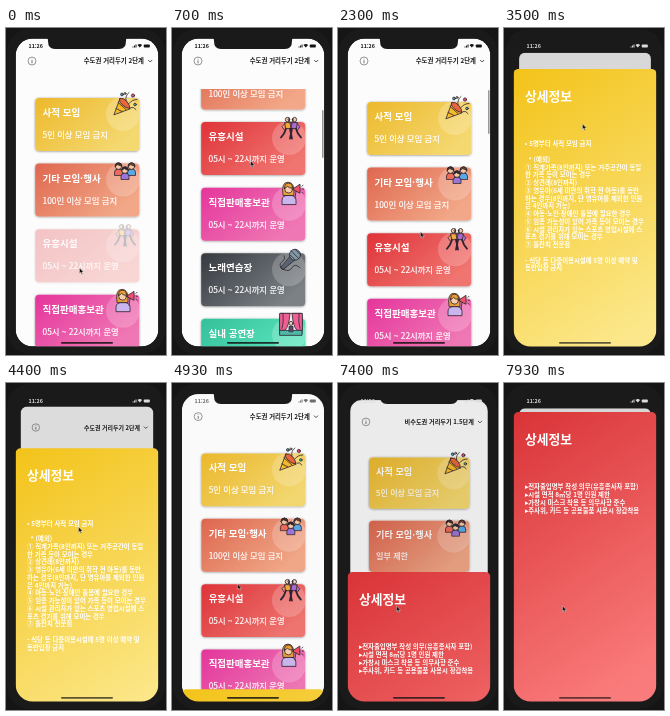
An HTML page that plays this animation: 160x327 px, repeating every 8 s.

```html
<!DOCTYPE html>
<html lang="ko">
<head>
<meta charset="utf-8">
<style>
  html, body { margin: 0; width: 100%; height: 100%; overflow: hidden; background: #151515; }
  svg { display: block; width: 100%; height: 100%; }
  text { font-family: "Noto Sans CJK KR", "Noto Sans CJK", "Noto Sans", sans-serif; white-space: pre; }
  .note { fill: #fff; stroke: #fff; stroke-width: .2; }
  .icon { stroke: #2b2430; stroke-width: .8; stroke-linejoin: round; stroke-linecap: round; }
</style>
</head>
<body>
<svg id="stage" viewBox="0 0 160 327"></svg>
<script>
const LOOP = 8000, SCREEN_BOTTOM = 319, SHEET_TOP = 29;
const CARD_TOP = 70, CARD_PITCH = 65.6;
const BEZEL = '#1a1a1a';
const stage = document.getElementById('stage');

// Text placed by its vertical centre
const label = (x, y, size, text, attrs = '') =>
  `<text x="${x}" y="${y + size * .37}" font-size="${size}" ${attrs}>${text}</text>`;
const path = (d, fill = 'none', extra = '') => `<path d="${d}" fill="${fill}" ${extra}/>`;
const dot = (x, y, r, fill) => `<circle cx="${x}" cy="${y}" r="${r}" fill="${fill}"/>`;
const rect = (x, y, w, h, fill, extra = '') =>
  `<rect x="${x}" y="${y}" width="${w}" height="${h}" fill="${fill}" ${extra}/>`;
const screenRect = (fill, extra) => rect(9.6, 10.4, 142.8, 308.2, fill, extra);
const gradient = (id, from, to, x2 = 1, y2 = .6) =>
  `<linearGradient id="${id}" x2="${x2}" y2="${y2}">
    <stop stop-color="${from}"/><stop offset="1" stop-color="${to}"/></linearGradient>`;

const person = (x, y, hair, shirt) =>
  path(`M${x - 4} ${y + 9}v-3q0-3 4-3t4 3v3z`, shirt) + dot(x, y, 3.3, '#f6c9a4') +
  path(`M${x - 3.3} ${y}a3.3 3.3 0 0 1 6.6 0q-3-.5-4-1.6q-1 1.2-2.6 1.6z`, hair);
const dancer = (x, flip, shirt) => `<g transform="translate(${x}) scale(${flip} 1)">` +
  path('M-1-5l5 0l1 6h-5zM4-4l4-4M-1-4l-3 3l2 3', shirt) +
  path('M0 1l-2 5l-3 4M4 1l1 5l-1 5', 'none', 'stroke-width="1.8"') +
  dot(1.5, -8, 2.2, '#f6c9a4') + '</g>';

// Icons drawn around their own centre, about 24 units wide
const icons = [
  path('M-11 11l6-16l10 10z', '#f7b928') + path('M-9 5l6 3M-7-1l8 7') +
    path('M-5-5q4-1 7 3t3 7q-4 0-8-4t-2-6z', '#e8663d') +
    path('M1-3q-1-5 3-8M4 0q3-4 8-4M6 4q3-1 5 2') +
    dot(-3, -9, 1.4, '#4aa8e0') + dot(8, -8, 1.6, '#ef4f74') + dot(10, 1, 1.3, '#56c596') + dot(0, -10, 1, '#ffd84a'),
  person(-6.5, -3, '#4b3324', '#ef6a5a') + person(6.5, -3, '#7a4527', '#59a9e8') + person(0, 1, '#2d2630', '#9b75d8'),
  dancer(-5, 1, '#f3a93c') + dancer(5, -1, '#a76bd6') + path('M-2-10v4M2-9v3'),
  path('M-9 11v-4q0-5 7-5t7 5v4z', '#c9b6ee') + path('M-8 2q-2-13 5-13t6 13z', '#e9a03a') +
    dot(-2.5, -4, 3.8, '#f8cfae') + path('M-6.500-5q0-5 4-5t4 5q-4 0-5-2q-1 2-3 2z', '#e9a03a') +
    path('M3-5l6-4v9l-6-3z', '#f25268') + path('M11-7l1-1M11.5-4h1M11-1l1 1M4 5l1-7'),
  path('M0-3l4 4l-12 10l-2-2z', '#596270') + dot(4, -4, 5.5, '#8199a6') +
    path('M0-8l8 8M4-9.500l5 5M-1-4l5 5') + path('M-9 10q-4-4 0-7t2-6M-9 10q7 4 10-1t8 0'),
  rect(-11, -11, 22, 21, '#f3f3ee', 'rx="1"') + path('M-11-11h10q-1 13-5 17h-5zM11-11h-10q1 13 5 17h5z', '#ef5f93') +
    path('M-8-11q1 9-1 15M8-11q-1 9 1 15') + path('M-11 6h22v5h-22z', '#4fb7a5') +
    dot(0, -1, 2, '#f8cfae') + path('M-2 7v-5h4v5z', '#5a4a70'),
  path('M-7-6h14l-2 17h-10z', '#e8942f') + path('M-6.300 0h12.600l-.7 6h-11.200z', '#f2c27e') +
    path('M-8-6v-3h2l1-2h10l1 2h2v3z', '#75492f') + dot(0, 3, 1.8, '#75492f')
];

const HOURS = '05시 ~ 22시까지 운영', PARTIAL = '일부 제한';
const cards = [
  ['사적 모임', '5인 이상 모임 금지', '#edb92c', '#f4d870'],
  ['기타 모임·행사', '100인 이상 모임 금지', '#df674f', '#f2a888', PARTIAL],
  ['유흥시설', HOURS, '#df3338', '#f07570', PARTIAL],
  ['직접판매홍보관', HOURS, '#e5359c', '#ef78b4'],
  ['노래연습장', HOURS, '#363a40', '#7c8185'],
  ['실내 공연장', HOURS, '#33c09a', '#5fe8c0'],
  ['식당·카페', HOURS, '#2aaec4', '#5cd8e6'],
  ['목욕장업', HOURS, '#6867d0', '#9fa1ec']
];

const cardMarkup = ([title, note, from, to, laterNote], i) => `
  <g id="card${i}" transform="translate(29 ${CARD_TOP + i * CARD_PITCH})">
    ${gradient('fill' + i, from, to)}
    ${rect(.2, 0, 104, 53, `url(#fill${i})`, 'rx="4" filter="url(#shadow)"')}
    <g clip-path="url(#cardClip)">${dot(88, 16, 17, 'rgba(255,255,255,.2)')}</g>
    ${label(7.5, 14.5, 9.5, title, 'fill="#fff" font-weight="700"')}
    ${label(7.5, 37, 8.35, note, `class="note ${laterNote ? 'before' : ''}"`)}
    ${laterNote ? label(7.5, 37, 8.35, laterNote, 'class="note after"') : ''}
    <g class="icon" transform="translate(90 5.5)">${icons[i] || ''}</g>
  </g>`;

const sheetMarkup = (id, from, to, lines) => `
  <g id="${id}">
    ${gradient(id + 'Fill', from, to, .3, 1)}
    ${rect(9.6, 0, 142.8, 320, `url(#${id}Fill)`, 'rx="5"')}
    <g fill="#fff" font-weight="700">
      ${label(21, 27, 12.8, '상세정보')}
      ${lines.map((line, i) => label(21, 75 + i * 7.75, 6.4, line)).join('')}
    </g>
  </g>`;

const yellowLines = [
  '• 5명부터 사적 모임 금지', '', '  * (예외)',
  '① 직계가족(8인까지) 또는 거주공간이 동일', '한 가족 등이 모이는 경우', '② 상견례(8인까지)',
  '③ 영유아(6세 미만의 취학 전 아동)를 동반', '하는 경우(8인까지, 단 영유아를 제외한 인원', '은 4인까지 가능)',
  '④ 아동·노인·장애인 돌봄에 필요한 경우', '⑤ 임종 가능성이 있어 가족 등이 모이는 경우',
  '⑥ 시설 관리자가 있는 스포츠 영업시설에 스', '포츠 경기를 위해 모이는 경우', '⑦ 돌잔치 전문점', '',
  '- 식당 등 다중이용시설에 5명 이상 예약 및', '동반입장 금지'
];
const redLines = [
  '▸전자출입명부 작성 의무(유흥종사자 포함)', '▸시설 면적 8㎡당 1명 인원 제한',
  '▸가창시 마스크 착용 등 의무사항 준수', '▸주사위, 카드 등 공용물품 사용시 장갑착용'
];

const METRO = '수도권 거리두기 2단계', REGION = '비수도권 거리두기 1.5단계';
const headerStyle = 'text-anchor="end" font-weight="700" fill="#1a1a1a"';

stage.innerHTML = `
  <defs>
    <clipPath id="screenClip">${screenRect('#fff', 'rx="17"')}</clipPath>
    <clipPath id="homeClip">${screenRect('#fff', 'rx="17" id="homeShape"')}</clipPath>
    <clipPath id="listClip">${rect(9, 61, 144, 258, '#fff')}</clipPath>
    <clipPath id="headerClip">${rect(50, 26, 89, 14, '#fff')}</clipPath>
    <clipPath id="cardClip">${rect(.2, 0, 104, 53, '#fff', 'rx="4"')}</clipPath>
    <filter id="shadow" x="-10%" y="-15%" width="120%" height="140%">
      <feDropShadow dx="0" dy=".4" stdDeviation="1.1" flood-opacity=".45"/>
    </filter>
  </defs>
  ${rect(1, 1, 158, 325, BEZEL, 'rx="23"')}
  <g clip-path="url(#screenClip)">
    <g id="home"><g clip-path="url(#homeClip)">
      ${screenRect('#fcfcfc', '')}
      <circle cx="26" cy="33" r="4" fill="none" stroke="#555" stroke-width=".6"/>
      ${path('M26 32.300v3M26 30.700v.6', 'none', 'stroke="#555" stroke-width=".8"')}
      <g clip-path="url(#headerClip)">
        ${label(138, 33, 6.4, METRO, headerStyle + ' class="before"')}
        <g id="region">${label(138, 33, 6.4, REGION, headerStyle + ' class="after"')}</g>
      </g>
      ${path('M142.200 32l2 2l2-2', 'none', 'stroke="#222" stroke-width=".8"')}
      <g clip-path="url(#listClip)">
        <g id="list">${cards.map(cardMarkup).join('')}</g>
        ${rect(150, 62, 1.6, 48, '#999', 'rx=".8" id="bar"')}
      </g>
      <g id="menu" text-anchor="end">
        ${label(139, 44.5, 5.1, METRO, 'fill="#777"')}
        ${label(139, 54, 5.1, REGION, 'fill="#777" id="choice"')}
      </g>
      ${screenRect('#000', 'id="dim"')}
    </g></g>
    ${sheetMarkup('yellow', '#f3c319', '#fce88c', yellowLines)}
    ${sheetMarkup('red', '#d93437', '#fa7b7b', redLines)}
    ${rect(55, 314, 52, 1.7, '#111', 'rx=".85" id="homeBar"')}
  </g>
  ${path('M39 9q3 0 3 4q0 8 7 8h64q7 0 7-8q0-4 3-4z', BEZEL)}
  <g id="status">
    ${label(22.5, 18, 5.4, '11:26', 'font-weight="600"')}
    ${path('M126.500 19.500v-1h1v1zM128 19.500v-2h1v2zM129.500 19.500v-3h1v3zM131.500 17q2.300-2 4.600 0l-2.300 2.600z', 'inherit')}
    ${rect(137.8, 16.5, 6, 3, 'inherit', 'rx=".8"')}
  </g>
  <g id="cursor">${path('M0 0v5.500l1.300-1.200l1 2.200l.9-.4l-1-2.100h1.800z', '#111', 'stroke="#fff" stroke-width=".35"')}</g>`;

const byId = id => document.getElementById(id);
const set = (id, name, value) => byId(id).setAttribute(name, value);
const clamp = v => Math.max(0, Math.min(1, v));
const ramp = (t, from, to) => clamp((t - from) / (to - from));

// Linear track of [time, value] pairs
function track(keys, t) {
  const i = keys.findIndex(([time]) => time > t);
  if (i < 0) return keys[keys.length - 1][1];
  if (i === 0) return keys[0][1];
  const [t0, v0] = keys[i - 1], [t1, v1] = keys[i];
  return v0 + (v1 - v0) * (t - t0) / (t1 - t0);
}

const scrollKeys = [[80, 0], [400, 55], [700, 107], [1000, 146], [1300, 163], [1500, 167],
  [1650, 160], [2000, 60], [2200, 3], [2300, -4], [2500, -2], [2900, 0]];
const yellowKeys = [[3220, 319], [3300, 190], [3400, 85], [3500, 41], [3600, 32], [3750, 29],
  [4150, 29], [4400, 65], [4650, 125], [4800, 225], [4930, 306], [5020, 319]];
const redKeys = [[7320, 319], [7400, 190], [7500, 85], [7600, 42], [7700, 32], [7850, 29]];
const cursorX = [[80, 75], [700, 80], [1500, 80], [2300, 84], [3000, 80], [4150, 80], [4700, 67],
  [5500, 67], [5800, 115], [6250, 125], [6500, 125], [7100, 60]];
const cursorY = [[80, 243], [700, 136], [1500, 136], [2000, 207], [2300, 207], [3000, 99], [4150, 99],
  [4700, 204], [5500, 204], [5800, 35], [6250, 57], [6500, 57], [7100, 226]];

function draw(t) {
  const scroll = track(scrollKeys, t);
  set('list', 'transform', `translate(0 ${-scroll})`);
  set('card2', 'opacity', .28 + .72 * ramp(t, 120, 400));
  set('bar', 'y', 62 + Math.max(0, scroll) * .186);
  set('bar', 'height', 48 + Math.min(0, scroll));
  set('bar', 'opacity', ramp(t, 80, 200) * (1 - ramp(t, 2400, 2600)));

  const yellowY = track(yellowKeys, t), redY = track(redKeys, t);
  set('yellow', 'transform', `translate(0 ${yellowY})`);
  set('red', 'transform', `translate(0 ${redY})`);
  const open = (SCREEN_BOTTOM - Math.min(yellowY, redY)) / (SCREEN_BOTTOM - SHEET_TOP);
  set('home', 'transform', `translate(81 ${10 + 15 * open}) scale(${1 - .08 * open}) translate(-81 -10)`);
  set('homeShape', 'rx', 17 - 11 * open);
  set('dim', 'opacity', .15 * open);
  set('homeBar', 'opacity', .85 - .2 * open);
  const shade = Math.round(20 + 200 * clamp(open * 10));
  set('status', 'fill', `rgb(${shade},${shade},${shade})`);

  const region = t >= 6320;
  document.querySelectorAll('.before').forEach(el => el.setAttribute('opacity', region ? 0 : 1));
  document.querySelectorAll('.after').forEach(el => el.setAttribute('opacity', region ? 1 : 0));
  set('region', 'transform', `translate(${9 * (1 - ramp(t, 6400, 6520))} 0)`);
  set('menu', 'opacity', ramp(t, 5780, 6000) * (1 - ramp(t, 6420, 6700)));
  set('choice', 'opacity', 1 - .45 * ramp(t, 6200, 6300));

  set('cursor', 'transform', `translate(${track(cursorX, t) - 1.5} ${track(cursorY, t) - 3})`);
}

const start = performance.now();
function frame() {
  draw((performance.now() - start) % LOOP);
  requestAnimationFrame(frame);
}
frame();
</script>
</body>
</html>
```
